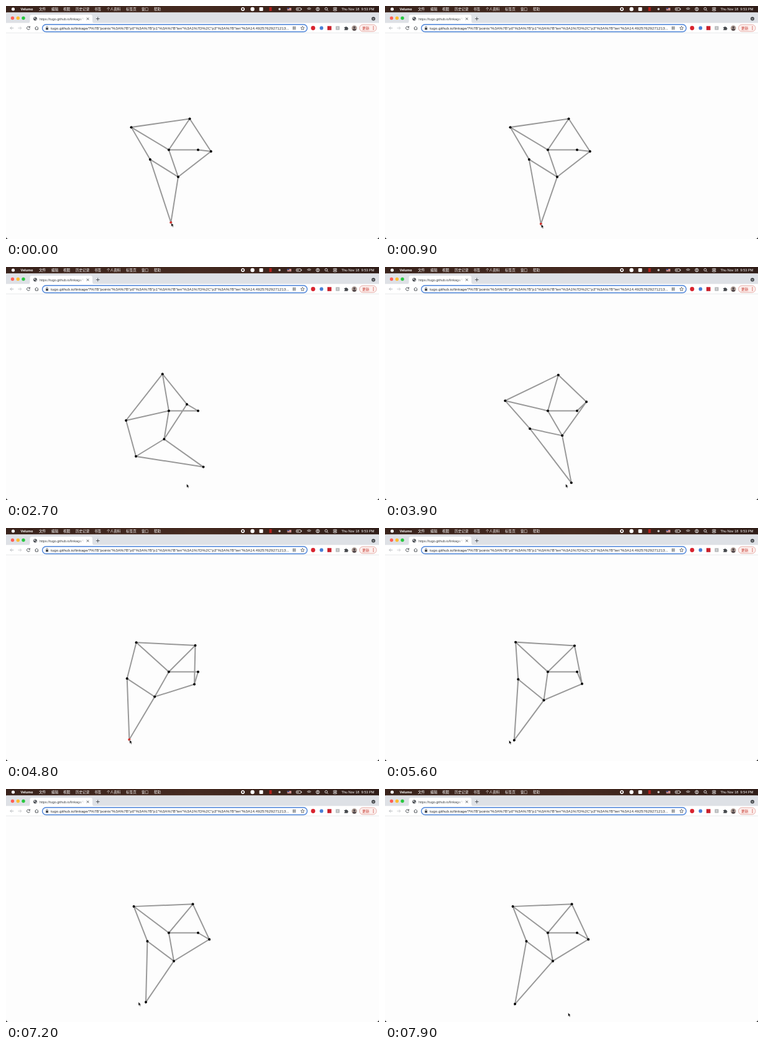
Recreate the animation shown at these times as an HTML page. Size 600 px wide and 375 px high, loop 8000 ms.

```html
<!DOCTYPE html>
<html lang="zh">
<head>
<meta charset="utf-8">
<style>
  html, body { margin: 0; width: 100%; height: 100%; overflow: hidden; background: #fdfdfd; }
  svg { display: block; width: 100vw; height: 100vh; }
  text { font-family: "Liberation Sans", "Noto Sans CJK SC", "Noto Sans CJK", sans-serif; white-space: pre; }
  .menu { font-size: 5.6px; fill: #fff; }
  .icon { fill: none; stroke: #45494d; stroke-width: .9; }
  .status { fill: none; stroke: #fff; stroke-width: .8; }
</style>
</head>
<body>
<svg viewBox="0 0 600 375">
  <defs>
    <linearGradient id="bar">
      <stop offset="0" stop-color="#39231c"/><stop offset=".5" stop-color="#452a20"/><stop offset="1" stop-color="#2f1d18"/>
    </linearGradient>
    <linearGradient id="fade">
      <stop offset=".85" stop-color="#3c4043"/><stop offset="1" stop-color="#3c4043" stop-opacity=".1"/>
    </linearGradient>
  </defs>
  <rect width="600" height="375" fill="#fdfdfd"/>

  <!-- Menu bar -->
  <rect width="600" height="10.5" fill="url(#bar)"/>
  <circle cx="11.5" cy="5" r="2.6" fill="#fff"/>
  <g id="menus" class="menu"><text x="23.5" y="7" font-weight="bold">Velumo</text></g>
  <circle cx="381" cy="5" r="2.6" fill="#fff" stroke="#fff"/>
  <circle cx="381" cy="5" r="1.4" fill="#39231c"/>
  <circle cx="396.5" cy="5" r="3.2" fill="#fff"/>
  <rect x="407.5" y="2" width="6" height="6" rx="1" fill="#fff"/>
  <rect x="423.5" y="2" width="4" height="6" fill="#b3201c"/>
  <circle cx="440" cy="5" r="1.8" fill="#ddd"/>
  <rect x="452.5" y="3" width="6.5" height="4.2" fill="#d8b5b2"/>
  <path d="M452.5 3h3v2h-3z" fill="#3d4c86"/>
  <path d="M455.5 4h3.5M452.5 6h6.5" stroke="#b6423f" stroke-width=".7"/>
  <g class="status">
    <rect x="467" y="3" width="7.5" height="4" rx="1"/>
    <path d="M468 5h3M475.6 4.2v1.6M484.3 4.3q3.2-2.6 6.4 0M485.5 5.8q2-1.5 4 0"/>
    <circle cx="501.5" cy="5" r="2.7"/><circle cx="501.5" cy="4.2" r=".8"/><path d="M500 7q1.5-1.6 3 0"/>
    <circle cx="515" cy="4.5" r="2"/><path d="M516.5 6l1.7 1.8"/>
    <rect x="526.5" y="2.5" width="5.5" height="2" rx="1"/><rect x="526.5" y="5.7" width="5.5" height="2" rx="1"/>
  </g>
  <text class="menu" id="clock" x="539.5" y="7"></text>

  <!-- Tab strip -->
  <path d="M0 27.5V12.5q0-2 2-2H598q2 0 2 2v15z" fill="#dee1e6"/>
  <circle cx="10.5" cy="19.5" r="2.7" fill="#fe5f57"/>
  <circle cx="19.3" cy="19.5" r="2.7" fill="#febc2e"/>
  <circle cx="28" cy="19.5" r="2.7" fill="#28c840"/>
  <path d="M35 27.5q3.5 0 3.5-3.5V17q0-3 3-3h94.500q3 0 3 3v7q0 3.500 3.500 3.500z" fill="#fff"/>
  <circle cx="47" cy="20.5" r="2.9" fill="#4d5156"/>
  <path d="M45 19.300l1.500-.8.8 1.200-1.300 1zM47.500 22l1-1.300.8.4-.7 1.500z" fill="#fff"/>
  <text x="54" y="22.500" font-size="5.4" fill="url(#fade)">https://tugo.github.io/linkage/?</text>
  <path class="icon" d="M129.800 18.800l3.600 3.600m0-3.600l-3.600 3.600M147.700 17.700v5.600M144.900 20.500h5.600"/>
  <circle cx="591" cy="20.500" r="3" fill="#45494d"/>
  <path d="M589.700 20l1.300 1.400 1.300-1.400" fill="none" stroke="#fff" stroke-width=".8"/>

  <!-- Toolbar -->
  <rect y="27.500" width="600" height="15.500" fill="#fff"/>
  <path d="M0 43.200H600" stroke="#dfe1e4" stroke-width=".7"/>
  <path class="icon" d="M12.300 35.500H6.800M9.300 33l-2.500 2.500 2.500 2.500" style="stroke:#b4b7ba"/>
  <path class="icon" d="M19.300 35.500h5.500M22.300 33l2.500 2.500-2.500 2.500" style="stroke:#c9cbcd"/>
  <path class="icon" d="M38 34a2.500 2.500 0 1 0 .4 2.200M38.500 32.500v2h-2M46.500 35.500l2.800-2.700 2.800 2.700M47.300 35v3h4v-3"/>
  <rect x="58.500" y="29.700" width="426" height="11.800" rx="5.900" fill="#fff" stroke="#4a82d8" stroke-width="1.400"/>
  <rect x="64" y="35" width="4" height="3.200" rx=".5" fill="#45494d"/>
  <path class="icon" d="M64.800 35v-1a1.200 1.200 0 0 1 2.400 0v1" style="stroke-width:.7"/>
  <text x="72" y="37.700" font-size="6.250" fill="#2b2e32">tugo.github.io/linkage/?%7B"points"%3A%7B"p0"%3A%7B"p1"%3A%7B"len"%3A1%7D%2C"p3"%3A%7B"len"%3A14.49257629271213...</text>
  <g class="icon" style="stroke-width:.7">
    <path d="M462.300 32.700v5.600M464.900 32.700v5.600M460.800 34.200h5.600M460.800 36.800h5.600"/>
    <path d="M477 32.500l.9 2 2.100.2-1.600 1.400.5 2.100-1.900-1.100-1.900 1.100.5-2.100-1.600-1.400 2.100-.2z"/>
  </g>
  <circle cx="494" cy="35.500" r="3.400" fill="#d9232e"/>
  <circle cx="507.500" cy="35.500" r="2.900" fill="#4a80d6"/>
  <rect x="517" y="32.300" width="6.500" height="6.500" fill="#c9202b"/>
  <rect x="530.500" y="32.500" width="6" height="6" fill="#b0b2b4"/>
  <path d="M532 34.500h3M532 36.500h3" stroke="#fff" stroke-width=".7"/>
  <path d="M544.300 34h1.700a1 1 0 0 1 2 0h1.700v1.600a1 1 0 0 1 0 2v1.100h-5.400v-1.400a.9.9 0 0 0 0-1.800z" fill="#45494d"/>
  <circle cx="560.300" cy="35.500" r="4.300" fill="#ac9a92"/>
  <path d="M557 38.200q3.300-4 6.600 0-3.300 3.200-6.600 0z" fill="#51474a"/><circle cx="560.300" cy="34.300" r="1.600" fill="#51474a"/>
  <rect x="568.500" y="30" width="27.500" height="11" rx="5.500" fill="#fdf0ee" stroke="#df9a94" stroke-width=".8"/>
  <text x="573" y="37.600" font-size="5.800" fill="#c5372c">更新</text>
  <g fill="#c5372c"><circle cx="591" cy="33.300" r=".7"/><circle cx="591" cy="35.500" r=".7"/><circle cx="591" cy="37.700" r=".7"/></g>

  <!-- Linkage, cursor and window corners -->
  <path id="bars" fill="none" stroke="#999" stroke-width="2"/>
  <g id="dots"></g>
  <path id="cursor" d="M0 0V6l1.400-1.200L2.400 7l1.100-.5-1-2.100H4.300z" fill="#000" stroke="#fff" stroke-width=".5"/>
  <path d="M0 371v4h4q-4 0-4-4zM600 371v4h-4q4 0 4-4z" fill="#000"/>
</svg>
<script>
const $ = id => document.getElementById(id);
const LOOP = 8000, STEP = 100;

const menuItems = { 53: '文件', 73: '编辑', 92: '视图', 112: '历史记录', 142: '书签', 162: '个人资料', 193: '标签页', 218: '窗口', 238: '帮助' };
for (const x in menuItems)
  $('menus').insertAdjacentHTML('beforeend', `<text x="${x}" y="7">${menuItems[x]}</text>`);
$('dots').innerHTML = '<circle r="2"/>'.repeat(8);

// Keyframes: time, then values
const crankAngle = [[0, 6.8], [1700, 6.8], [2000, -163.3], [2700, -509.7], [3900, -1124],
  [4300, -1333.3], [4800, -1333.3], [6400, -2131.6], [7100, -2489.8]];
const footLengths = [[0, 106.9, 74.3], [300, 106.9, 74.3], [800, 104.6, 80.5], [1400, 109.8, 77.4],
  [4400, 109.8, 77.4], [4700, 98.1, 80], [7300, 98.1, 80], [7600, 102.8, 92.2]];
const cursorPath = [[1400, 267, 352], [1600, 290.5, 349], [3900, 290.5, 349], [4400, 227, 348.5],
  [4700, 199.5, 341.5], [7100, 199.5, 341.5], [7300, 226.5, 344], [7600, 211, 347.5], [7900, 294.5, 360]];
const drags = [[0, 1400], [4400, 4800], [7300, 7600]];

function at(keys, t) {
  const next = keys.findIndex(k => k[0] > t);
  if (next < 0) return keys[keys.length - 1].slice(1);
  const b = keys[next], a = keys[Math.max(next - 1, 0)];
  const f = a === b ? 0 : (t - a[0]) / (b[0] - a[0]);
  return a.slice(1).map((v, i) => v + (b[i + 1] - v) * f);
}

// Point at distance rp from p and rq from q, clockwise of the line p-q
function joint(p, q, rp, rq) {
  const dx = q[0] - p[0], dy = q[1] - p[1], d = Math.hypot(dx, dy);
  const along = (rp * rp - rq * rq + d * d) / (2 * d);
  const side = Math.sqrt(Math.max(0, rp * rp - along * along));
  return [p[0] + (dx * along - dy * side) / d, p[1] + (dy * along + dx * side) / d];
}

function draw(now) {
  const t = Math.floor(now % LOOP / STEP) * STEP;
  const angle = at(crankAngle, t)[0] * Math.PI / 180;
  const pivot = [261.9, 231.5], axle = [309, 231.5];
  const crank = [axle[0] + 20.9 * Math.cos(angle), axle[1] + 20.9 * Math.sin(angle)];
  const top = joint(crank, pivot, 62.6, 60.2);
  const left = joint(top, pivot, 95, 70.5);
  const hip = joint(pivot, crank, 46.1, 66.9);
  const knee = joint(left, hip, 60, 53.2);
  const foot = joint(knee, hip, ...at(footLengths, t));

  const loops = [[axle, crank, top, left, knee, foot, hip, crank], [axle, pivot, top], [left, pivot, hip, knee]];
  $('bars').setAttribute('d', loops.map(l => 'M' + l.join('L')).join(''));

  const dragging = drags.some(([from, to]) => t >= from && t <= to);
  [pivot, axle, crank, top, left, hip, knee, foot].forEach((p, i) => {
    const dot = $('dots').children[i];
    dot.setAttribute('cx', p[0]);
    dot.setAttribute('cy', p[1]);
    dot.setAttribute('fill', p === foot && dragging ? '#d02a25' : '#000');
  });

  const [x, y] = dragging ? [foot[0] + .5, foot[1] + .5] : at(cursorPath, t);
  $('cursor').setAttribute('transform', `translate(${x} ${y})`);
  $('clock').textContent = `Thu Nov 18  9:${t < 7500 ? 53 : 54} PM`;
}

const start = performance.now();
(function tick() {
  draw(performance.now() - start);
  requestAnimationFrame(tick);
})();
</script>
</body>
</html>
```
